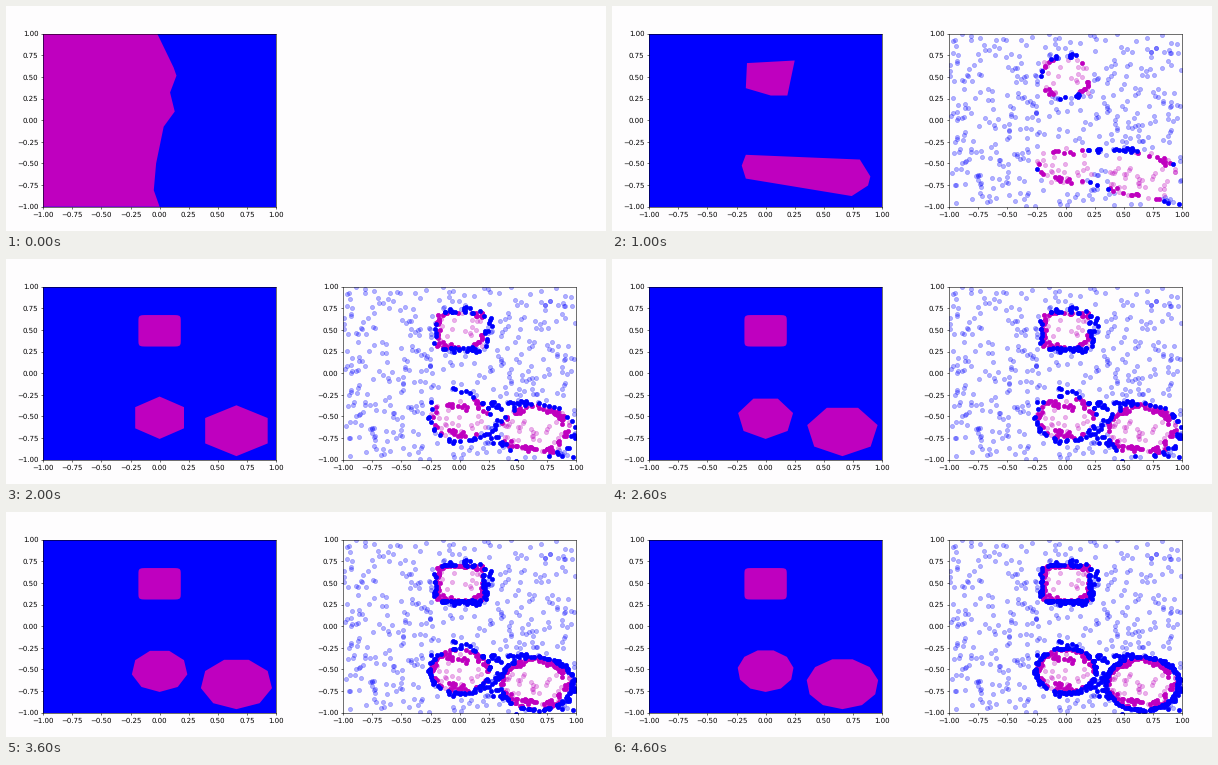
A matplotlib script for the animation above (5000 ms loop, 600x225 px).

```python
import numpy as np
import matplotlib.pyplot as plt
from matplotlib.animation import FuncAnimation
from matplotlib.collections import PolyCollection

plt.rcParams.update({
    "font.family": "DejaVu Sans",
    "font.size": 10,
    "text.hinting": "none",
})

BLUE, MAGENTA, PAPER = "#0000ff", "#bf00bf", "#fefdfe"
STEP_MS, LOOP_MS = 200, 5000
STARTS = [0, 600, 1000, 1600, 2000, 2600, 3000, 3600, 4000, 4600]
N_RANDOM, N_EDGE = 500, 100

rng = np.random.default_rng(7)


def blob(cx, cy, rx, ry, n):
    """Polygon with n corners on an ellipse, one of them at the bottom."""
    t = 2 * np.pi * np.arange(n) / n - np.pi / 2
    return np.column_stack([cx + rx * np.cos(t), cy + ry * np.sin(t)])


def soft_square(cx, cy, half, power=12):
    t = np.linspace(0, 2 * np.pi, 80, endpoint=False)
    ray = np.column_stack([np.cos(t), np.sin(t)])
    r = half / (np.abs(ray) ** power).sum(axis=1) ** (1 / power)
    return np.array([cx, cy]) + ray * r[:, None]


def fitted(step):
    """Late predictions: the three shapes, with more corners at each step."""
    n = step + 2
    return [soft_square(0, .49, .182),
            blob(0, -.515, .242, .245, n),
            blob(.66, -.665, .31, .294, n)]


def predict(step):
    """Regions that the classifier assigns to the magenta class."""
    if step == 0:
        return [[(-1, 1), (-.02, 1), (.12, .61), (.145, .515), (.09, .32),
                 (.13, .1), (.035, -.075), (-.03, -.5), (-.05, -.81),
                 (0, -1), (-1, -1)]]
    if step == 1:
        return [blob(0, .505, .19, .23, 9) * (1, -1) + (0, 1.01),
                [(-.225, -.55), (-.155, -.4), (.585, -.357), (1, -.605),
                 (1, -.93), (.95, -.94), (-.185, -.617)]]
    if step == 2:
        return [[(-.16, .66), (.25, .69), (.187, .285), (.045, .285),
                 (-.17, .37)],
                [(-.17, -.4), (.81, -.455), (.9, -.65), (.88, -.755),
                 (.74, -.877), (-.17, -.675), (-.205, -.525)]]
    if step == 3:
        return [[(-.155, .7), (.213, .63), (.165, .307), (-.18, .31)],
                [(-.18, -.165), (.055, -.235), (.28, -.525), (.27, -.675),
                 (-.03, -.78), (-.17, -.7), (-.25, -.49)],
                [(.305, -.675), (.43, -.51), (.715, -.375), (.895, -.465),
                 (.975, -.675), (.895, -.86), (.69, -1), (.51, -1)]]
    return fitted(step)


def sample_edges(polys, spread):
    """Noisy points just outside the outlines, spread by length."""
    starts = [np.array(p) for p in polys]
    a = np.concatenate(starts)
    b = np.concatenate([np.roll(p, -1, axis=0) for p in starts])
    mid = np.concatenate([np.zeros_like(p) + p.mean(axis=0) for p in starts])
    d = b - a
    size = np.hypot(d[:, 0], d[:, 1])
    on_frame = ((a == b) & (abs(a) == 1)).any(axis=1)
    weight = np.where(on_frame, 0, size)
    i = rng.choice(len(a), N_EDGE, p=weight / weight.sum())
    pts = a[i] + rng.random((N_EDGE, 1)) * d[i]
    normal = np.column_stack([d[i, 1], -d[i, 0]]) / size[i, None]
    outward = np.sign(((pts - mid[i]) * normal).sum(axis=1))
    shift = outward * rng.normal(.022, spread, N_EDGE)
    return pts + normal * shift[:, None]


def inside(p):
    x, y = p[:, 0], p[:, 1]
    square = (abs(x) < .2) & (abs(y - .5) < .2)
    disc = np.hypot(x, y + .51) < .25
    big_disc = np.hypot(x - .655, y + .66) < .3
    return square | disc | big_disc


regions = [predict(k) for k in range(len(STARTS))]
base = rng.uniform(-1, 1, (N_RANDOM, 2))
added = np.concatenate([sample_edges(r, .015 / (1 + .2 * k))
                        for k, r in enumerate(regions[1:-1])])
added_in = inside(added)

fig = plt.figure(figsize=(12, 4.5), dpi=50, facecolor=PAPER)


def panel(left, color):
    ax = fig.add_axes([left, .108, .388, .769], facecolor=color)
    ticks = np.linspace(-1, 1, 9)
    ax.set(xlim=(-1, 1), ylim=(-1, 1), xticks=ticks, yticks=ticks)
    return ax


def dots(ax, pts, color, alpha, z):
    return ax.scatter(pts[:, 0], pts[:, 1], s=36, c=color, alpha=alpha,
                      linewidths=1, zorder=z)


left = panel(.062, BLUE)
right = panel(.562, PAPER)
shapes = PolyCollection([], facecolors=MAGENTA, edgecolors="none")
left.add_collection(shapes, autolim=False)

base_in = inside(base)
dots(right, base[~base_in], BLUE, .3, 1)
dots(right, base[base_in], MAGENTA, .3, 1.1)
empty = np.empty((0, 2))
new_in = dots(right, empty, MAGENTA, 1, 1.2)
new_out = dots(right, empty, BLUE, 1, 1.3)


def update(frame):
    step = np.searchsorted(STARTS, frame * STEP_MS, side="right") - 1
    shapes.set_verts(regions[step])
    right.set_visible(step > 0)
    n = max(step - 1, 0) * N_EDGE
    pts, hit = added[:n], added_in[:n]
    new_in.set_offsets(pts[hit])
    new_out.set_offsets(pts[~hit])
    return shapes, new_in, new_out


anim = FuncAnimation(fig, update, frames=LOOP_MS // STEP_MS,
                     interval=STEP_MS, repeat=True, repeat_delay=0)
plt.show()
```
